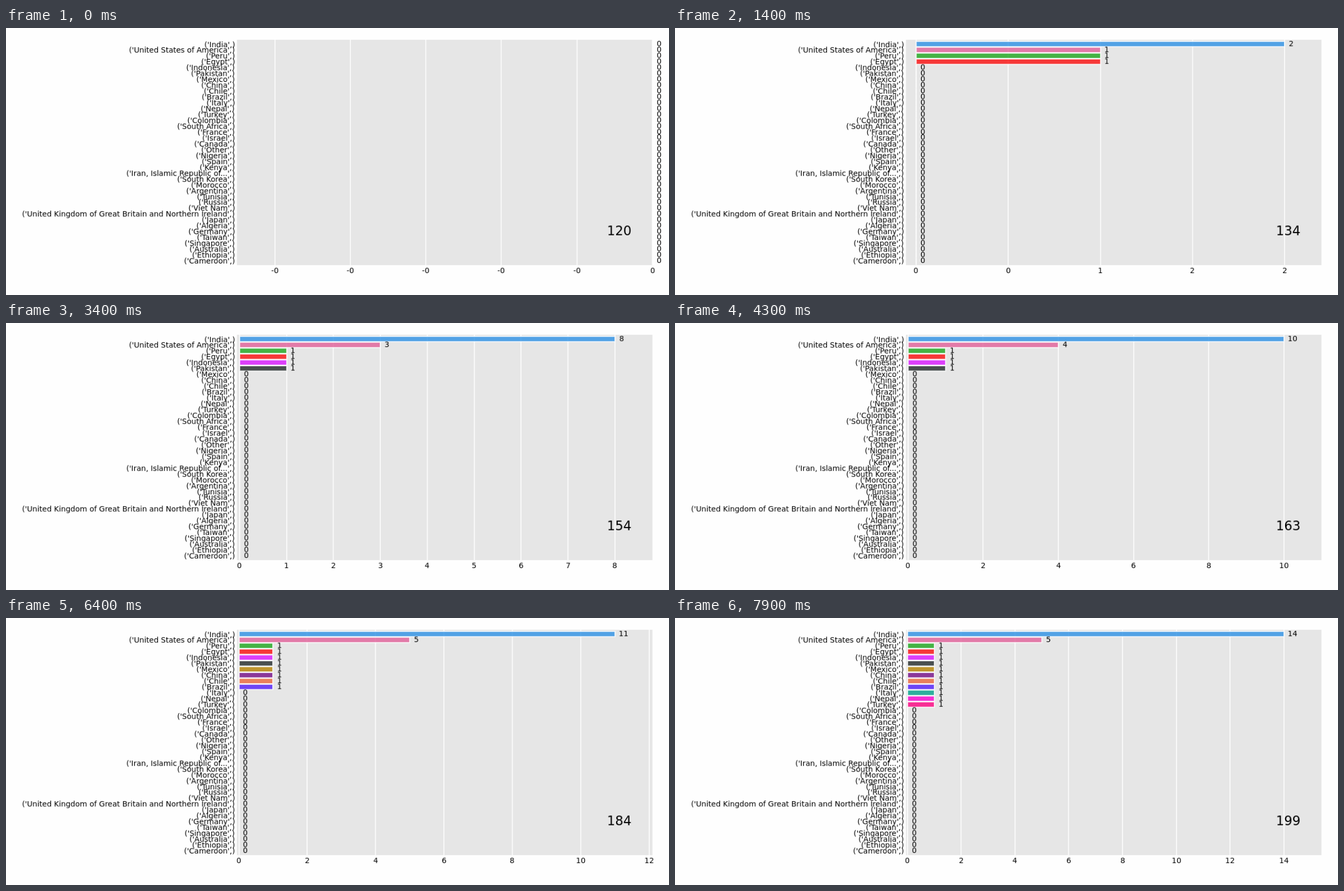
Write an HTML page with a canvas that moves like this. It is 1178 px wide and 475 px high and loops after 8 s.

```html
<!DOCTYPE html>
<html lang="en">
<head>
<meta charset="utf-8">
<title>Bar chart race</title>
<style>
html, body { margin: 0; width: 100%; height: 100%; overflow: hidden; background: #fefefe; }
canvas { display: block; width: 1178px; height: 475px; }
</style>
</head>
<body>
<!-- Drawn on a 1240 x 500 grid, shown at 95 % -->
<canvas id="stage" width="1240" height="500"></canvas>
<script>
const ctx = document.getElementById('stage').getContext('2d');

const names = ['India', 'United States of America', 'Peru', 'Egypt', 'Indonesia', 'Pakistan',
  'Mexico', 'China', 'Chile', 'Brazil', 'Italy', 'Nepal', 'Turkey', 'Colombia', 'South Africa',
  'France', 'Israel', 'Canada', 'Other', 'Nigeria', 'Spain', 'Kenya',
  'Iran, Islamic Republic of...', 'South Korea', 'Morocco', 'Argentina', 'Tunisia', 'Russia',
  'Viet Nam', 'United Kingdom of Great Britain and Northern Ireland', 'Japan', 'Algeria',
  'Germany', 'Taiwan', 'Singapore', 'Australia', 'Ethiopia', 'Cameroon'];

const colors = ['#2e91e5', '#e15f99', '#1ca71c', '#fb0d0d', '#da16ff', '#222a2a', '#b68100',
  '#750d86', '#eb663b', '#511cfb', '#00a08b', '#fb00d1', '#fc0080'];

// Days on which each row's count goes up by one.
const rises = [
  [122, 128, 140, 142, 146, 149, 150, 152, 159, 163, 168, 186, 190, 195],
  [124, 141, 144, 161, 165],
  [126], [132], [143], [153], [172], [173], [177], [181], [188], [193], [196]
];

const FIRST_DAY = 120, DAYS = 80, DAY_MS = 100;
const LEFT = 432, WIDTH = 777, TOP = 22, HEIGHT = 422;
const PITCH = HEIGHT / 38.5;
const X_MIN = -0.055;

function text(str, x, baseline, align = 0, size = 14) {
  ctx.font = `${size}px "DejaVu Sans", sans-serif`;
  ctx.fillStyle = '#000';
  ctx.fillText(str, Math.round(x - align * ctx.measureText(str).width), Math.round(baseline));
}

// Whole-number label, halves rounded to even, keeping the sign of small negatives.
function tickLabel(v) {
  const n = Math.abs(v % 1) === 0.5 ? 2 * Math.round(v / 2) : Math.round(v);
  return v < 0 && n === 0 ? '-0' : String(n);
}

function draw(day) {
  const values = names.map((_, i) => (rises[i] || []).filter(d => d <= day).length);
  const xMax = 1.1 * Math.max(...values);
  const range = xMax - X_MIN;
  const toX = v => LEFT + WIDTH * (v - X_MIN) / range;
  const rowY = i => TOP + PITCH * (i + 0.75);

  ctx.globalAlpha = 1;
  ctx.fillStyle = '#fefefe';
  ctx.fillRect(0, 0, 1240, 500);
  ctx.fillStyle = '#e6e6e6';
  ctx.fillRect(LEFT, TOP, WIDTH, HEIGHT);

  const step = [0.01, 0.2, 0.5, 1, 2].find(s => s >= range / 9);
  for (let k = Math.ceil(X_MIN / step); k * step <= xMax; k++) {
    const x = toX(k * step);
    ctx.fillStyle = '#fff';
    ctx.fillRect(Math.round(x) - 0.8, TOP, 1.6, HEIGHT);
    text(tickLabel(k * step), x, 459, 0.5);
  }

  ctx.globalAlpha = 0.8;
  ctx.strokeStyle = '#fff';
  ctx.lineWidth = 2;
  values.forEach((v, i) => {
    const x = Math.round(toX(0)), w = Math.round(toX(v)) - x;
    const y = Math.round(rowY(i) - 0.475 * PITCH);
    const h = Math.round(rowY(i) + 0.475 * PITCH) - y;
    ctx.fillStyle = colors[i] || '#fff';
    ctx.fillRect(x, y, w, h);
    ctx.strokeRect(x, y, w, h);
  });

  ctx.globalAlpha = 1;
  values.forEach((v, i) => {
    text(`('${names[i]}',)`, LEFT - 4, rowY(i) + 5.3, 1);
    text(String(v), toX(v) + 0.01 * WIDTH, rowY(i) + 3.9);
  });
  text(String(day), LEFT + 0.95 * WIDTH, 388, 1, 24);
}

const start = performance.now();
function tick() {
  const elapsed = performance.now() - start;
  draw(FIRST_DAY + Math.floor(elapsed / DAY_MS) % DAYS);
  requestAnimationFrame(tick);
}
tick();
</script>
</body>
</html>
```
